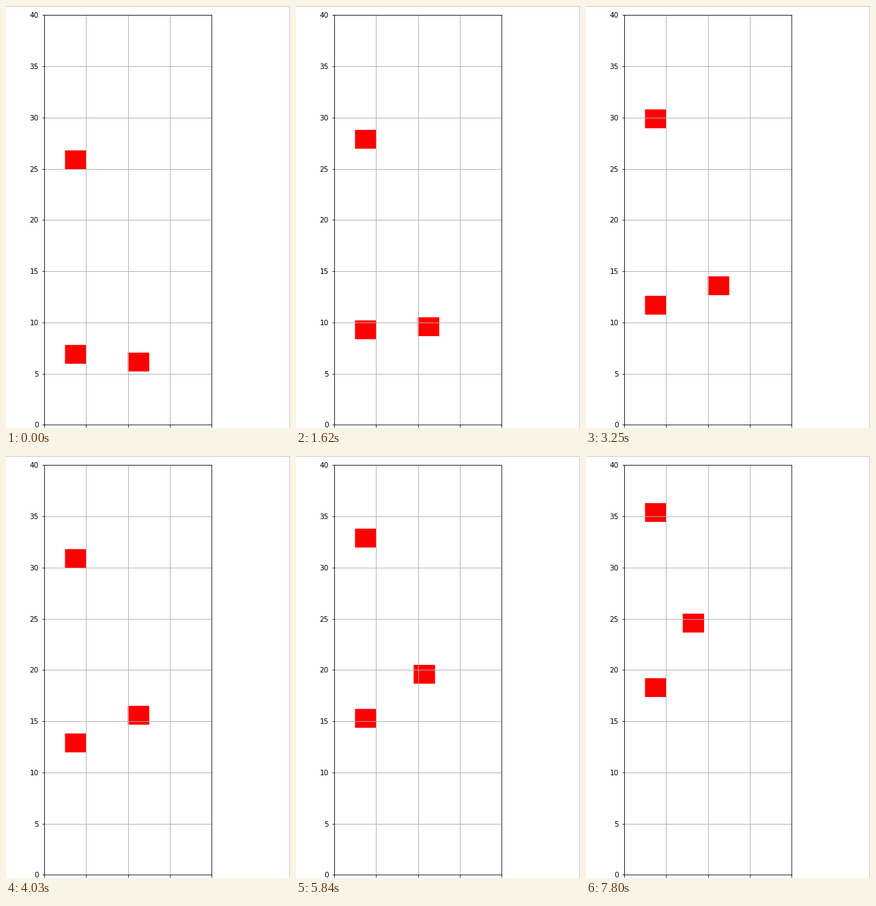
A matplotlib script for the animation above (8 s loop, 416 by 616 pixels).

```python
import numpy as np
import matplotlib.pyplot as plt
from matplotlib.animation import FuncAnimation
from matplotlib.lines import Line2D
from matplotlib.patches import Rectangle

WIDTH, HEIGHT, DPI = 416, 616, 100
PX = 72 / DPI                       # points per pixel
LOOP, INTERVAL = 8000, 20
CAR_W, CAR_H, CAR_DROP = 0.51, 1.84, 0.04
STEP_TIMES = np.array([380, 760, 1220, 1620, 2000, 2400, 2870, 3250, 3650, 4030,
                       4440, 4970, 5440, 5840, 6220, 6600, 7020, 7420, 7800])
STEPS = len(STEP_TIMES) + 1

plt.rcParams["font.family"] = "DejaVu Sans"
fig = plt.figure(figsize=(WIDTH / DPI, HEIGHT / DPI), dpi=DPI, facecolor="white")
ax = fig.add_axes([55.75 / WIDTH, 4.65 / HEIGHT, 245.52 / WIDTH, 597.96 / HEIGHT])
ax.set(xlim=(0, 4), ylim=(0, 40), xticks=range(5), yticks=range(0, 41, 5))
ax.grid(color="#b0b0b0", linewidth=0.9 * PX)
ax.tick_params(length=3.5 * PX, width=0.8 * PX, pad=4.5 * PX, labelsize=10.5 * PX)
ax.tick_params(axis="x", labelbottom=False)
for spine in ax.spines.values():
    spine.set_linewidth(0.8 * PX)


def page_edge(xs, ys):
    fig.add_artist(Line2D(np.array(xs) / WIDTH, np.array(ys) / HEIGHT,
                          color="#cccccc", linewidth=PX, snap=False))


page_edge([0, WIDTH], [HEIGHT - 0.5] * 2)
page_edge([WIDTH - 0.5] * 2, [0, HEIGHT])

# The overtaking car speeds up to one unit per step, then drifts to the left lane.
speeds = np.ones(STEPS)
speeds[:5] = 5.25, 0.75, 0.85, 0.9, 0.95
fast_y = np.cumsum(speeds)

cars = [ax.add_patch(Rectangle((0, 0), CAR_W, CAR_H, facecolor="red",
                               linewidth=0, snap=False)) for _ in range(3)]


def update(frame):
    step = np.searchsorted(STEP_TIMES, frame * INTERVAL + INTERVAL / 2, side="right")
    fast_x = 2 - 0.1 * max(0, step - 13)
    places = [(0.5, 25 + 0.5 * step), (0.5, 6 + 0.6 * step), (fast_x, fast_y[step])]
    for car, (x, y) in zip(cars, places):
        car.set_xy((x, y - CAR_DROP))
    return cars


anim = FuncAnimation(fig, update, frames=LOOP // INTERVAL, interval=INTERVAL,
                     repeat=True, repeat_delay=0)
plt.show()
```
